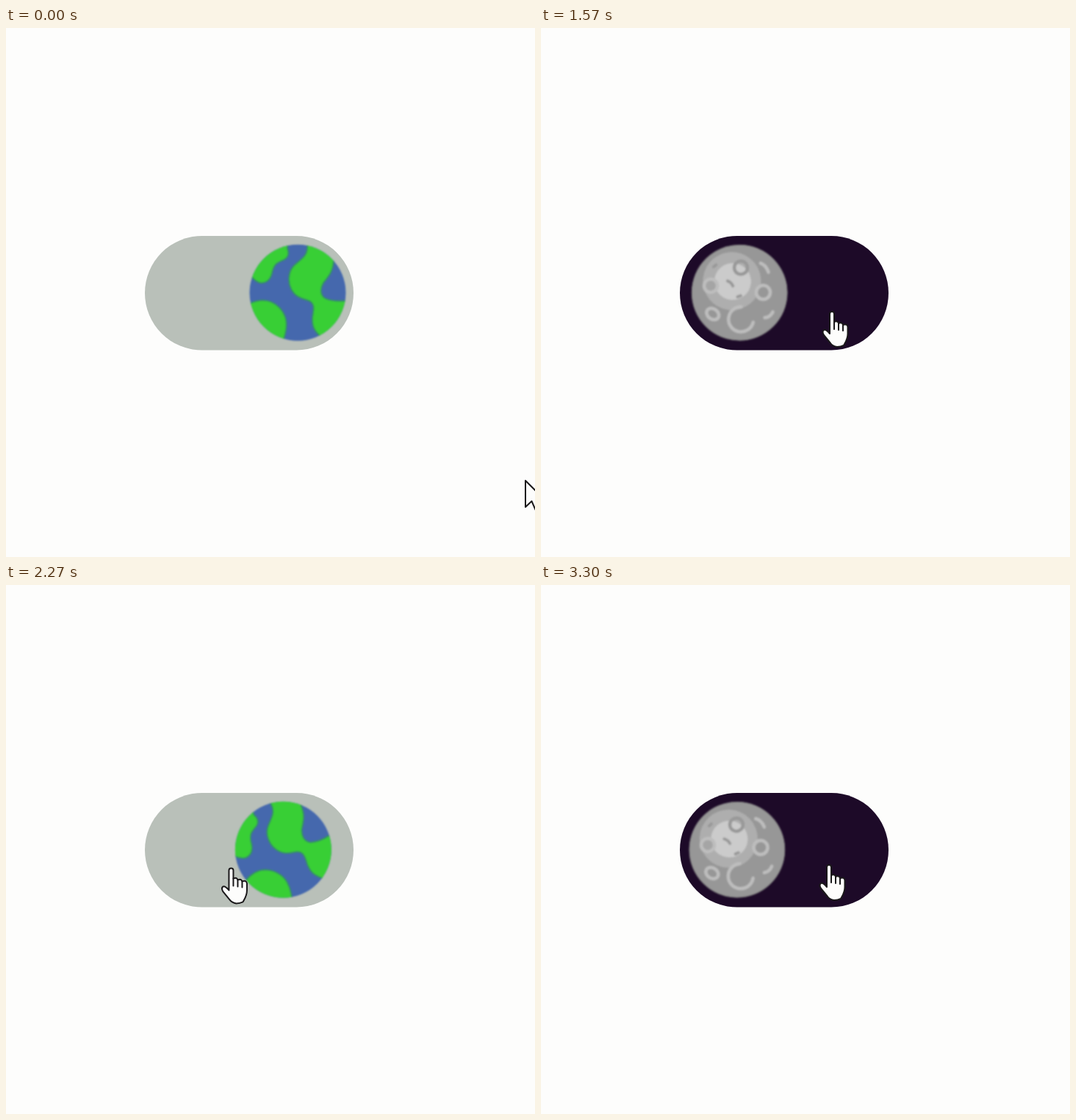
These frames come from a looping animation (720x720 px, 3330 ms). An HTML page:

```html
<!DOCTYPE html>
<html lang="en">
<head>
<meta charset="utf-8">
<title>Day and night switch</title>
<style>
  html, body { margin: 0; width: 100%; height: 100%; overflow: hidden; background: #fdfdfc; }
  svg { display: block; width: 100vw; height: 100vh; }
</style>
</head>
<body>
<svg viewBox="0 0 720 720">
  <defs>
    <clipPath id="disc"><circle r="65.5"/></clipPath>
    <filter id="soft"><feGaussianBlur stdDeviation=".9"/></filter>
  </defs>
  <rect id="track" x="189" y="283" width="284" height="155.5" rx="77.75"/>
  <g id="knob" filter="url(#soft)"><g clip-path="url(#disc)">
    <g id="earth">
      <circle r="66" fill="#4568ad"/>
      <g fill="#37cf35" stroke="#35885f" stroke-width="2">
        <path d="M-13-70L-14-60Q-10-50-18-45C-27-41-31-40-34-30C-36-18-42-13-50-13Q-57-14-63-22L-80-30L-50-75Z"/>
        <path d="M-75 17L-64 14C-50 8-36 9-25 20C-15 31-12 42-19 64L-30 80L-80 60Z"/>
        <path d="M13-75V-62C13-50 5-46-4-38C-13-30-14-15-9-5C-4 5 4 8 12 10C24 13 22 22 20 33C19 45 22 51 30 59L40 80L85 60L80 11L64 11C54 12 45 11 38 8C30 3 31-6 35-13C43-23 48-29 49-43L60-75Z"/>
      </g>
    </g>
    <g id="moon" fill="none" stroke="#bdbdbd" stroke-width="4.5" stroke-linecap="round">
      <circle r="65" fill="#979797" stroke="#7c7c7c" stroke-width="1.5"/>
      <circle cx="-12" cy="-14.5" r="39.5" fill="#aeaeae" stroke="none"/>
      <circle cx="-11" cy="-14" r="25" fill="#cbcbcb" stroke="none"/>
      <circle cx="-2" cy="-34" r="9" stroke="#999"/>
      <circle cx="32" cy="-4" r="9.5" fill="#979797"/>
      <circle cx="-40" cy="-5" r="9" fill="#a5a5a5"/>
      <ellipse cx="-33" cy="33" rx="9" ry="7" transform="rotate(30 -33 33)"/>
      <path d="M4.500 19A17 17 0 1 0 23 38"/>
      <path d="M24-43Q32-41 36-32M38 30Q45 29 48 21"/>
      <path d="M-18-14Q-13-13-10-8M-2 6L2 4M-39-31L-36-34" stroke="#999" stroke-width="4"/>
    </g>
  </g></g>
  <g fill="#fdfdfc" stroke="#1a181a" stroke-width="2" stroke-linejoin="round" stroke-linecap="round">
    <path id="arrow" d="M0 0V36L8.500 28L13.500 39.500L19 37L14 26H26Z"/>
    <g id="hand">
      <path d="M-2 2Q-2-1 1-1Q4-1 4 2V13Q9 11 10 15Q15 13 16 17Q22 15 22.500 20V29C22.500 37 19 41 17 45Q13 47 8 47Q2 46-1 42L-10 31Q-13 26-10 24Q-7 23-2 29Z"/>
      <path d="M4 13V23M10 15V24M16 17V25" fill="none"/>
    </g>
  </g>
</svg>
<script>
const LOOP = 3330, DAY_X = 397, NIGHT_X = 265.5;
const el = id => document.getElementById(id);
const [track, knob, earth, moon, arrow, hand] =
  ['track', 'knob', 'earth', 'moon', 'arrow', 'hand'].map(el);

// start, duration, night?
const clicks = [[848, 950, true], [1745, 950, false], [2712, 680, true]];

// time, x, y of the pointer tip
const path = [
  [0, 706, 615], [20, 706, 615], [520, 395, 386], [1600, 395, 386], [1740, 304, 386],
  [2080, 304, 386], [2620, 309, 384], [2780, 309, 384], [3180, 400, 393], [3300, 391, 381]
];

const smooth = u => u * u * (3 - 2 * u);

// cubic-bezier(.25, .1, .25, 1)
function ease(x) {
  if (x <= 0) return 0;
  if (x >= 1) return 1;
  let lo = 0, hi = 1, s;
  for (let i = 0; i < 24; i++) {
    s = (lo + hi) / 2;
    const at = .75 * s * (1 - s) + s ** 3;
    if (at < x) lo = s; else hi = s;
  }
  return .3 * s * (1 - s) ** 2 + 3 * s * s * (1 - s) + s ** 3;
}

function pointer(t) {
  const i = path.findIndex(k => k[0] > t);
  if (i < 0) return path[path.length - 1].slice(1);
  const [t0, x0, y0] = path[i - 1], [t1, x1, y1] = path[i];
  const u = smooth((t - t0) / (t1 - t0));
  return [x0 + (x1 - x0) * u, y0 + (y1 - y0) * u];
}

function inTrack(x, y) {
  const dx = x - Math.min(Math.max(x, 266.75), 395.25);
  return Math.hypot(dx, y - 360.75) < 77.75;
}

const show = (node, on) => node.setAttribute('visibility', on ? 'visible' : 'hidden');
const move = (node, x, y, turn = 0) =>
  node.setAttribute('transform', `translate(${x} ${y}) rotate(${turn})`);

function draw(t) {
  let night = false, day = 1;
  for (const [start, length, toNight] of clicks) {
    if (t < start) break;
    const e = ease((t - start) / length);
    night = toNight;
    day = night ? 1 - e : e;
  }
  track.setAttribute('fill', night ? '#1d0a28' : '#b9c0b9');
  move(knob, NIGHT_X + (DAY_X - NIGHT_X) * day, 360.2);
  move(earth, 0, 0, 180 * (day - 1));
  move(moon, 0, 0, 180 * day);
  show(earth, !night);
  show(moon, night);

  const [x, y] = pointer(t), over = inTrack(x, y);
  move(arrow, x + 1, y + 1);
  move(hand, x, y + 1);
  show(arrow, !over);
  show(hand, over);
}

const begin = performance.now();
function tick() {
  draw((performance.now() - begin) % LOOP);
  requestAnimationFrame(tick);
}
draw(0);
requestAnimationFrame(tick);
</script>
</body>
</html>
```
